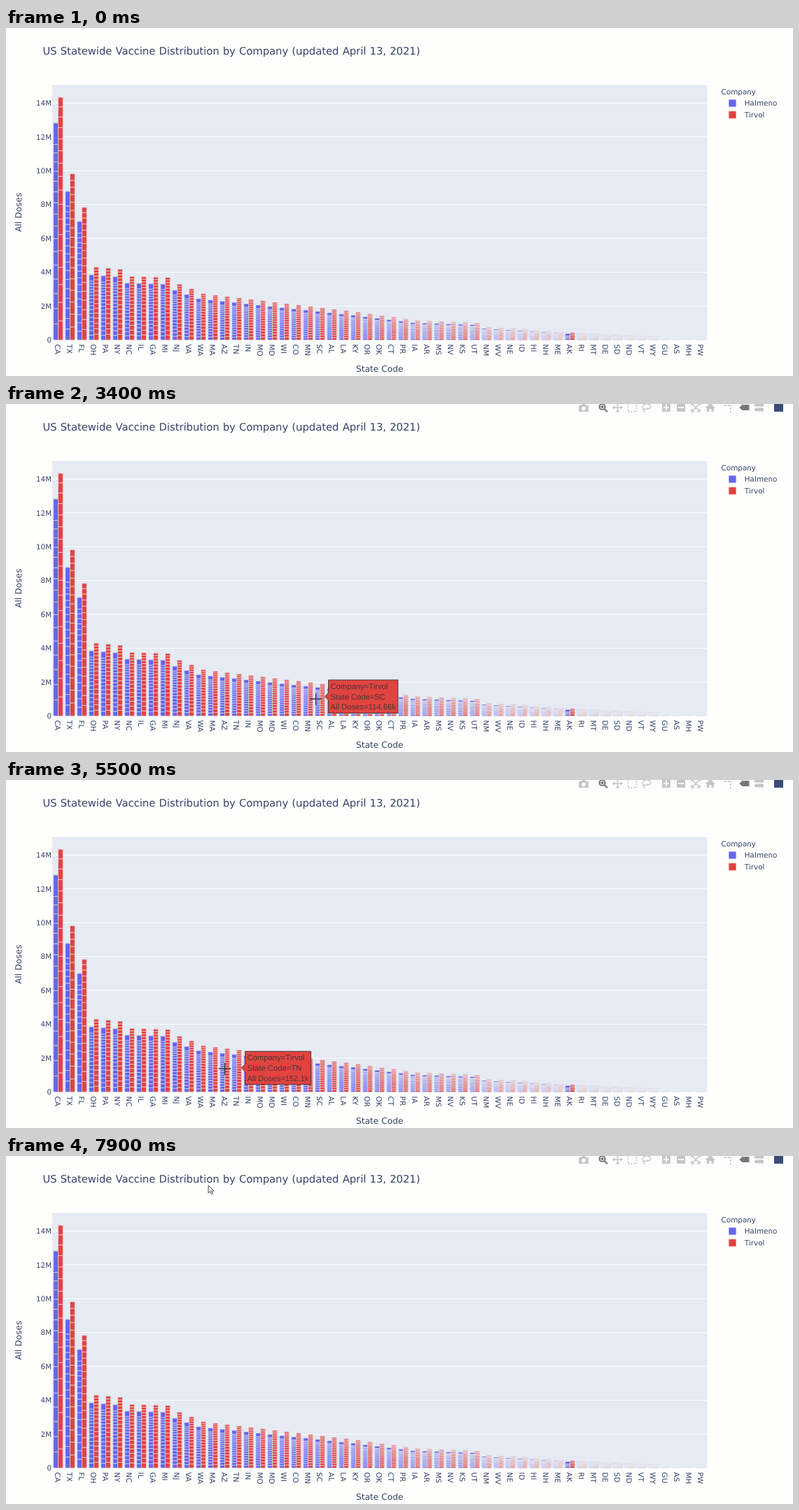
Animation of 1124x498 px, one loop 8000 ms. Source, as an HTML page:

```html
<!DOCTYPE html>
<html lang="en">
<head>
<meta charset="utf-8">
<title>Vaccine distribution chart</title>
<style>
  html, body { margin: 0; width: 100%; height: 100%; overflow: hidden; background: #fefffc; }
  svg { display: block; width: 1124px; height: 498px; }
  text {
    font: 10.41px Verdana, "DejaVu Sans", sans-serif; word-spacing: .034em;
    fill: #36426a; white-space: pre; text-rendering: geometricPrecision;
  }
  .axis { font-size: 12.15px; }
  .title { font-size: 14.75px; }
  #tip text { font: 11.28px Arial, "Liberation Sans", sans-serif; word-spacing: 0; fill: inherit; }
</style>
</head>
<body>
<svg id="stage" viewBox="0 0 1124 498">
  <rect width="1124" height="498" fill="#fefffc"/>
  <rect x="66" y="81.5" width="935.5" height="365" fill="#e5eaf3"/>
  <g id="grid"></g>
  <g id="bars" stroke="#e5eaf3" stroke-width=".55"></g>
  <g id="labels"></g>
  <g id="toolbar" fill="#c3c5ca" stroke="#c3c5ca" stroke-width="0">
    <path fill-rule="evenodd" d="M818 2h3.5l1.500-2h4l1.500 2h3.500v9h-14zM825 3.500a3 3 0 1 0 .01 0z"/>
    <g fill="none" stroke="#77787e" stroke-width="2.2">
      <circle cx="851.5" cy="4" r="4"/><path d="M854.5 7l4.5 4.5M849.5 4h4M851.5 2v4"/>
    </g>
    <path fill="none" stroke-width="1.5" d="M867 5h13M873.5-1v12.5M869 3l-2 2 2 2M878 3l2 2-2 2M871.5 9.5l2 2 2-2"/>
    <path fill="none" stroke-width="1.8" stroke-dasharray="2 2" d="M888.5-1v12h12v-12"/>
    <path fill="none" stroke-width="1.5" d="M911 8c-4-3-1-9 5-8s7 6 1 7-6-1-6 1 1 2 0 4"/>
    <path fill-rule="evenodd" d="M937-1h12v12h-12zM942 1v3h-3v2h3v3h2v-3h3v-2h-3v-3z"/>
    <path fill-rule="evenodd" d="M958-1h12v12h-12zM960 4v2h8v-2z"/>
    <path fill="none" stroke-width="1.6" d="M979 2v-3M979 7v4h4M987 11h4v-4M991 2v-3M980 0l10 10M990 0l-10 10"/>
    <path d="M999 5l7-6 7 6-1 1-1-.8v5.800h-3.500v-4h-3v4h-3.500v-5.800l-1 .8z"/>
    <path fill="none" stroke-width="1.8" stroke-dasharray="2.5 2" d="M1026 2h8M1035 1v11"/>
    <path fill="#77787e" d="M1047.5 5l4-4h10v8h-10z"/>
    <path d="M1068 2l3-3h11v4.500h-11zM1068 8l3-2.500h11v5h-11z"/>
    <rect x="1097" y="0" width="13" height="11" fill="#3d4b78"/>
  </g>
  <g id="tip"><path id="tipBox"/><text/><text/><text/></g>
  <path id="cross" fill="none" stroke="#30343c" stroke-width="1.3" d="M-8 0H9M.5-8V9"/>
  <path id="arrow" fill="#fff" stroke="#40434a" d="M0 0V11l2.600-2.400 1.800 4 1.900-.8-1.800-3.900H8z"/>
</svg>
<script>
const $ = id => document.getElementById(id);
const BRANDS = ['Halmeno', 'Tirvol'];
const COLORS = ['#6465ed', '#e2433f'];
const STATES = ('CA TX FL OH PA NY NC IL GA MI NJ VA WA MA AZ TN IN MO MD WI CO MN SC AL LA KY OR OK ' +
  'CT PR IA AR MS NV KS UT NM WV NE ID HI NH ME AK RI MT DE SD ND VT WY GU AS MH PW').split(' ');
// Key points of the falling curve: state index, first brand's doses in millions.
const CURVE = [[0, 12.82], [1, 8.78], [2, 7], [3, 3.85], [5, 3.74], [6, 3.36], [9, 3.3], [10, 2.94],
  [12, 2.44], [19, 1.91], [25, 1.46], [30, 1.02], [35, .9], [36, .68], [43, .38], [50, .19], [51, .04], [54, .01]];
// Pointer path: time, x, y.
const POINTER = [[1100, 1000, 60], [1700, 720, 330], [1900, 720, 330], [2500, 488, 409], [3300, 455, 420],
  [3400, 442, 422], [3900, 394, 422], [4700, 394, 422], [5400, 338, 414], [5500, 312, 413],
  [5800, 306, 413], [6600, 306, 413], [6700, 276, 411], [7300, 100, 200], [7500, 133, 141], [7900, 289, 42]];
const READOUTS = { SC: '114.66', WI: '114.2', TN: '152.1', MA: '159.12' };
const RATIO = 1.118, SLOT = 17, BAR = 6.8, HOVER_LAG = 80;

// Linear interpolation between rows that start with their key.
function along(rows, key) {
  const n = Math.max(1, rows.findIndex(row => row[0] >= key));
  const [a, b] = [rows[n - 1], rows[n]];
  const k = Math.max(0, (key - a[0]) / (b[0] - a[0]));
  return a.slice(1).map((from, i) => from + (b[i + 1] - from) * k);
}

const centerX = i => 74.5 + i * SLOT;
const doseY = m => 446.4 - m * 24.22;
const doses = (i, brand) => along(CURVE, i)[0] * (brand ? RATIO : 1);

function add(parent, tag, attrs, content = '') {
  const el = document.createElementNS('http://www.w3.org/2000/svg', tag);
  for (const key in attrs) el.setAttribute(key, attrs[key]);
  el.textContent = content;
  return parent.appendChild(el);
}
const label = (content, x, y, attrs = {}) => add($('labels'), 'text', { x, y, ...attrs }, content);

// Weekly deliveries shrink towards the top; the first brand opened with a large one.
function weeklyShares(brand, count) {
  const weeks = Array.from({ length: count }, (_, i) => 7.5 - 4 * i / count);
  if (!brand) weeks[count - 1] *= 2.7;
  const sum = weeks.reduce((a, b) => a + b);
  return weeks.map(week => week / sum);
}

function drawBar(i, brand) {
  const total = doses(i, brand);
  const x = centerX(i) - BAR * (1 - brand);
  let base = 0, d = '';
  for (const share of weeklyShares(brand, STATES[i] === 'AK' ? 4 : 17)) {
    const top = base + total * share;
    d += `M${x} ${doseY(base).toFixed(2)}V${doseY(top).toFixed(2)}h${BAR}V${doseY(base).toFixed(2)}z`;
    base = top;
  }
  add($('bars'), 'path', { d, fill: COLORS[brand] });
}

function drawChart() {
  for (let m = 0; m <= 14; m += 2) {
    const y = doseY(m);
    add($('grid'), 'path', { d: `M66 ${y}H1001.5`, stroke: '#fff', 'stroke-width': m ? 1.1 : 1.8 });
    label(m ? m + 'M' : '0', 65.2, y + 3.8, { 'text-anchor': 'end' });
  }
  STATES.forEach((state, i) => {
    drawBar(i, 0);
    drawBar(i, 1);
    label(state, 0, 0, { transform: `translate(${centerX(i) - 5} 452.6) rotate(90)` });
  });
  label('US Statewide Vaccine Distribution by Company (updated April 13, 2021)', 52.4, 38.2, { class: 'title' });
  label('State Code', 533.7, 492.4, { class: 'axis', 'text-anchor': 'middle' });
  label('All Doses', 0, 0, { class: 'axis', 'text-anchor': 'middle', transform: 'translate(21.5 263.7) rotate(-90)' });
  label('Company', 1021.5, 95.2);
  BRANDS.forEach((brand, i) => {
    const y = 107.6 + i * 16.7;
    add($('labels'), 'rect', { x: 1032.4, y: y - 5.1, width: 10.2, height: 10.2, fill: COLORS[i] });
    label(brand, 1054.8, y + 3.8);
  });
}

const show = (el, on) => { el.style.display = on ? '' : 'none'; };

// The hover label belongs to the bar that was under the pointer a moment ago.
function drawTip(t) {
  const [px, py] = along(POINTER, t - HOVER_LAG);
  const i = Math.max(0, Math.min(STATES.length - 1, Math.round((px - centerX(0)) / SLOT)));
  const brand = px > centerX(i) ? 1 : 0;
  const total = doses(i, brand);
  const hovered = py > doseY(total);
  show($('tip'), hovered);
  if (!hovered) return;

  const x = centerX(i) + BAR * brand, y = py - 1.8, left = x + 5.3;
  const ink = brand ? '#48343a' : '#fff';
  const amount = READOUTS[STATES[i]] || (total * 61.5).toFixed(2);
  const rows = [`Company=${BRANDS[brand]}`, `State Code=${STATES[i]}`, `All Doses=${amount}k`];
  let width = 0;
  $('tip').querySelectorAll('text').forEach((row, n) => {
    row.textContent = rows[n];
    row.setAttribute('x', left + 2.8);
    row.setAttribute('y', y + 4 + (n - 1) * 14.7);
    width = Math.max(width, row.getComputedTextLength());
  });
  $('tip').setAttribute('fill', ink);
  $('tipBox').setAttribute('d', `M${x} ${y}l5.3 5.2V${y + 23.7}h${width + 5.8}V${y - 23.7}H${left}V${y - 5.2}z`);
  $('tipBox').setAttribute('fill', COLORS[brand]);
  $('tipBox').setAttribute('stroke', ink);
}

function render(time) {
  const t = Math.floor(time % 8000 / 100) * 100;
  const [x, y] = along(POINTER, t);
  const inPlot = x < 1001 && y > 81;
  $('toolbar').setAttribute('opacity', Math.max(0, Math.min(1, (t - 1000) / 300)));
  for (const [id, on] of [['cross', inPlot], ['arrow', !inPlot]]) {
    show($(id), t >= 1100 && on);
    $(id).setAttribute('transform', `translate(${x} ${y})`);
  }
  drawTip(t);
}

drawChart();
const start = performance.now();
function loop() {
  render(performance.now() - start);
  requestAnimationFrame(loop);
}
loop();
</script>
</body>
</html>
```
